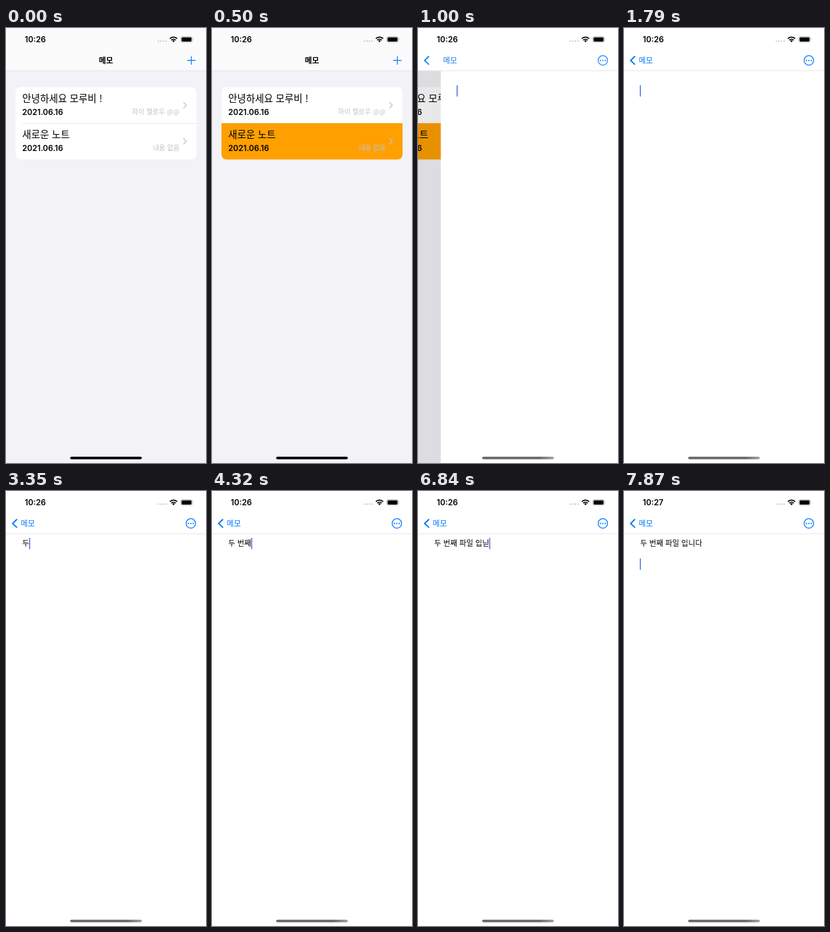
An HTML page for the animation above (7990 ms loop, 296 px wide and 640 px high).

```html
<!DOCTYPE html>
<html lang="ko">
<head>
<meta charset="utf-8">
<title>메모</title>
<style>
  html, body { margin: 0; width: 100%; height: 100%; overflow: hidden; background: #fff; }
  svg { display: block; }
  text { font-family: "Noto Sans CJK KR", "Noto Sans CJK", sans-serif; white-space: pre; }
  .num { font: 600 11.7px Inter, sans-serif; }
  .head { font-size: 14.4px; }
  .sub { font-size: 10px; fill: #c2c2c6; text-anchor: end; }
  .nav { font-size: 11.4px; text-anchor: middle; }
  .line { fill: none; stroke-linecap: round; stroke-linejoin: round; }
  .blue { stroke: #007aff; }
</style>
</head>
<body>
<svg width="296" height="640" viewBox="0 0 296 640">
  <defs>
    <linearGradient id="fade">
      <stop offset=".8" stop-color="#696969"/>
      <stop offset="1" stop-color="#a0a0a0"/>
    </linearGradient>
    <clipPath id="card"><rect x="14" y="87" width="268" height="106.5" rx="7.5"/></clipPath>
  </defs>

  <rect width="296" height="640" fill="#f2f2f7"/>
  <g id="list">
    <g clip-path="url(#card)">
      <rect x="14" y="87" width="268" height="107" fill="#fff"/>
      <rect x="24" y="140" width="258" height=".7" fill="#dedee2"/>
      <rect id="picked" x="14" y="140" width="268" height="54" fill="#ff9f00"/>
    </g>
    <text class="head" x="24" y="108.6">안녕하세요 모루비 !</text>
    <text class="num" x="24" y="127.7">2021.06.16</text>
    <text class="sub" x="257" y="127.2">하이 헬로우 @@</text>
    <text class="head" x="24" y="161.6">새로운 노트</text>
    <text class="num" x="24" y="180.7">2021.06.16</text>
    <text class="sub" x="257" y="180.2">내용 없음</text>
    <path class="line" stroke="#c4c4c8" stroke-width="1.3" d="M263 109.8l4 4-4 4M263 162.8l4 4-4 4"/>
  </g>
  <rect id="dim" width="296" height="640"/>

  <g id="page">
    <rect width="296" height="640" fill="#fff"/>
    <text id="note" x="24" y="81.2" font-size="11.2" font-weight="500"></text>
    <rect id="caret" width="1.4" height="16.6" fill="#4468ea"/>
  </g>

  <rect id="bar" width="296" height="63"/>
  <rect y="62.5" width="296" height=".8" fill="#e2e2e4"/>
  <text id="title" class="nav" y="51.7"></text>
  <path id="plus" class="line blue" stroke-width="1.2" d="M268.5 47.7h11.6M274.3 41.9v11.6"/>
  <g id="tools">
    <path class="line blue" stroke-width="1.9" d="M15.8 42l-6 5.7 6 5.7"/>
    <circle class="line blue" stroke-width="1.2" cx="273.6" cy="47.7" r="7"/>
    <path class="line blue" stroke-width="2.1" d="M270 47.7h0M273.6 47.7h0M277.2 47.7h0"/>
  </g>

  <text id="clock" class="num" x="27.8" y="21"></text>
  <path class="line" stroke="#c6c6c8" stroke-width="2.2" d="M225.6 19.3h0M229.4 19.3h0M233.1 19.3h0M236.9 19.3h0"/>
  <g class="line" stroke="#000" stroke-width="1.7" style="stroke-linecap:butt">
    <path d="M242.5 15.6a7.6 7.6 0 0 1 10.8 0M244.5 17.9a4.8 4.8 0 0 1 6.8 0"/>
    <path fill="#000" stroke="none" d="M246 19a2.7 2.7 0 0 1 3.8 0l-1.9 2z"/>
  </g>
  <rect x="258.6" y="12.6" width="17.2" height="8.4" rx="2.4" fill="none" stroke="#aaa" stroke-width=".8"/>
  <rect x="259.8" y="13.7" width="14.8" height="6.2" rx="1.4"/>
  <path d="M276.8 15.4q1.4 1.4 0 2.8z" fill="#aaa"/>

  <rect id="home" x="95" y="630.7" width="106" height="3.8" rx="1.9"/>
</svg>
<script>
const LOOP = 7990;
const el = Object.fromEntries([...document.querySelectorAll('[id]')].map(e => [e.id, e]));
const set = (id, attrs) => {
  for (const k in attrs) el[id].setAttribute(k, attrs[k]);
};

// [start ms, value]: each value holds until the next start
const typed = [
  [0, ''], [2760, 'ㄷ'], [3350, '두'], [3660, '두 ㅂ'], [3780, '두 버'], [3900, '두 번'],
  [4140, '두 번ㅉ'], [4320, '두 번째'], [4620, '두 번째 '], [5080, '두 번째 파'],
  [5260, '두 번째 팡'], [5520, '두 번째 파일'], [5660, '두 번째 파일 '],
  [5870, '두 번째 파일 이'], [6080, '두 번째 파일 입ㄴ'], [6310, '두 번째 파일 입니'],
  [6840, '두 번째 파일 입닏'], [6960, '두 번째 파일 입니다']
];
const blink = [[0, 1], [1430, 0], [1670, .5], [1790, 1], [2330, .5], [2450, .15], [2760, 1]];
const at = (track, t) => track.findLast(([start]) => t >= start)[1];

// The push settles exponentially, in visible steps of 108 ms
function pageX(t) {
  const step = Math.floor((t - 890) / 108);
  return step < 0 ? 296 : step < 5 ? 130 * Math.exp(-1.35 * step) : 0;
}

function draw(t) {
  const x = pageX(t), p = 1 - x / 296, pushed = p > 0;
  const mix = (a, b) => Math.round(a + (b - a) * p);

  set('picked', { opacity: t >= 500 ? 1 : 0 });
  set('list', { transform: `translate(${-88.8 * p})` });
  set('dim', { opacity: .1 * p });
  set('page', { transform: `translate(${x})` });

  set('bar', { fill: pushed ? '#fff' : '#fbfbfc' });
  set('title', {
    x: pushed ? 32.3 + .45 * x : 148,
    'font-weight': p < .5 ? 700 : 400,
    fill: `rgb(0,${mix(0, 122)},${mix(0, 255)})`,
    opacity: 1 - p * (1 - p)
  });
  set('plus', { opacity: Math.max(0, 1 - 1.15 * p) });
  set('tools', { opacity: p });
  set('home', { fill: !pushed ? '#000' : 'url(#fade)' });

  const text = at(typed, t), newline = t >= 7370;
  el.note.textContent = text;
  set('caret', {
    x: text && !newline ? 24 + el.note.getComputedTextLength() : 23.5,
    y: newline ? 99.2 : text ? 69 : 84.2,
    opacity: at(blink, t)
  });
  el.title.textContent = '메모';
  el.clock.textContent = t < 7870 ? '10:26' : '10:27';
}

const begin = performance.now();
(function tick() {
  draw((performance.now() - begin) % LOOP);
  requestAnimationFrame(tick);
})();
</script>
</body>
</html>
```
